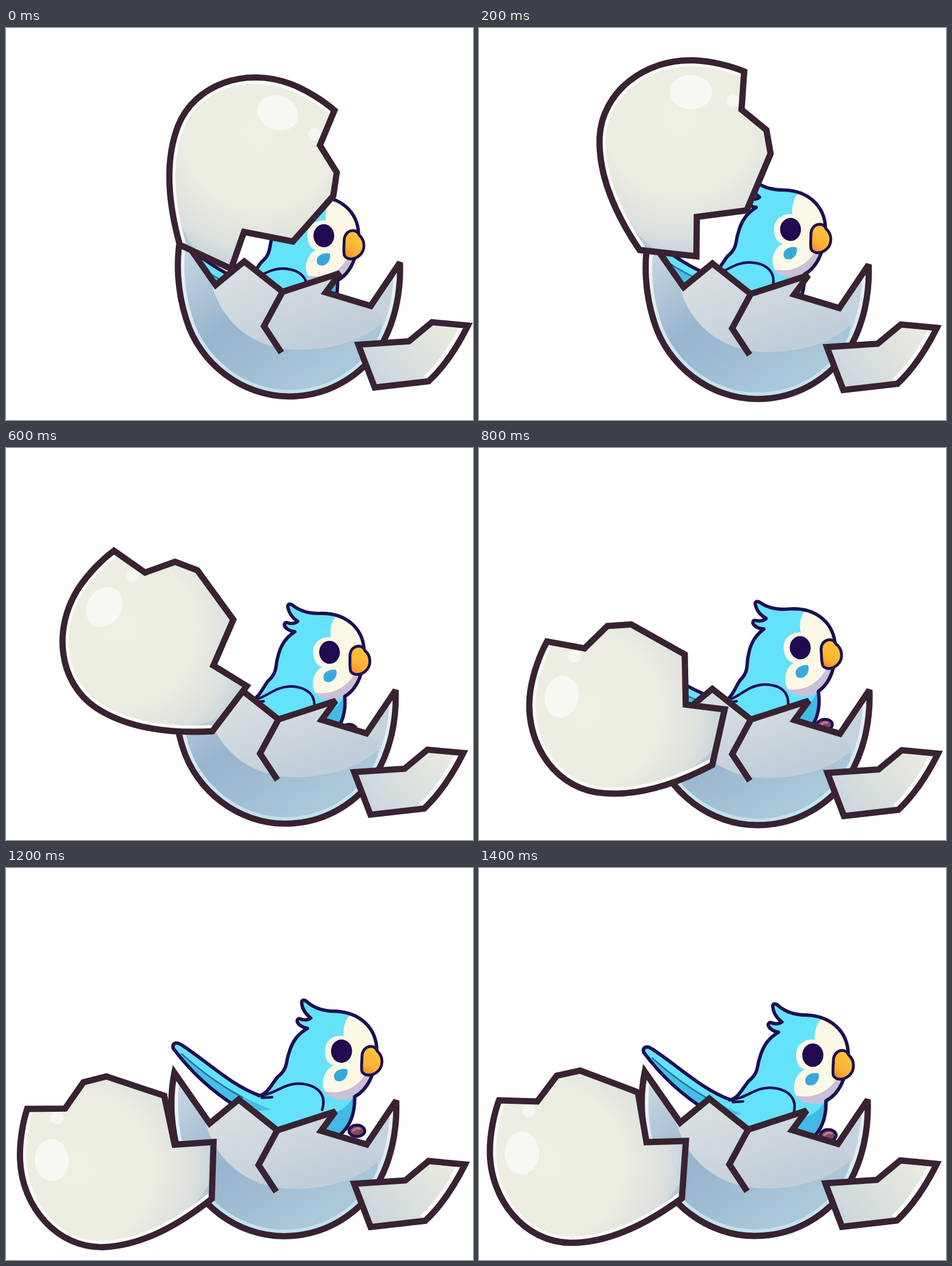
Write an HTML page that moves like this. It is 817 by 685 pixels and loops after 6.6 s.

```html
<!DOCTYPE html>
<html lang="en">
<head>
<meta charset="utf-8">
<title>Hatching bird</title>
<style>
html, body { margin: 0; width: 100%; height: 100%; overflow: hidden; background: #fff; }
svg { display: block; width: 817px; height: 685px; }
.line { fill: none; stroke: #392231; stroke-width: 11; stroke-miterlimit: 3; }
.ink { fill: none; stroke: #1d1050; stroke-width: 6; stroke-linejoin: round; stroke-linecap: round; }
</style>
</head>
<body>
<svg viewBox="0 0 817 685">
  <defs>
    <path id="bodyShape" d="M514 243C513 236 519 236 524 241C538 253 555 257 574 257C615 259 645 285 646 325C645 365 630 395 607 407C608 440 596 462 580 475L470 480L400 425C360 400 320 365 288 322C286 312 294 310 304 317C350 347 390 387 440 405C454 402 461 385 472 372C490 358 486 345 491 332C497 310 507 297 524 287C516 286 508 281 506 275C506 270 509 269 513 271C520 273 525 273 530 269C521 262 515 253 514 243Z"/>
    <path id="cupShape" d="M290 356C281 400 283 455 300 507C324 585 400 643 482 643C560 643 615 600 645 555C672 510 682 455 680 405L628 482L548 458L573 424L471 457L403 403L352 445Z"/>
    <path id="chipShape" d="M606 551L696 545L737 511L801 517C782 555 759 590 731 616L635 627Z"/>
    <path id="capShape" d="M35 406L102 408L136 363L177 354L278 392L293 479L362 477L355 577C290 625 225 655 160 655C80 654 19 580 19 495C19 465 26 430 35 406Z"/>
    <clipPath id="bodyClip"><use href="#bodyShape"/></clipPath>
    <clipPath id="cupClip"><use href="#cupShape"/></clipPath>
    <clipPath id="chipClip"><use href="#chipShape"/></clipPath>
    <clipPath id="capClip"><use href="#capShape"/></clipPath>
    <clipPath id="window"><rect id="windowRect" width="817" height="685"/></clipPath>
    <linearGradient id="cupDark" gradientUnits="userSpaceOnUse" x1="300" y1="370" x2="480" y2="645">
      <stop offset="0" stop-color="#cbd8e2"/><stop offset=".5" stop-color="#98b4ce"/><stop offset="1" stop-color="#abc7da"/>
    </linearGradient>
    <linearGradient id="cupLight" gradientUnits="userSpaceOnUse" x1="440" y1="420" x2="490" y2="560">
      <stop offset="0" stop-color="#d8dedf"/><stop offset="1" stop-color="#c1ced8"/>
    </linearGradient>
    <linearGradient id="rim" gradientUnits="userSpaceOnUse" x1="0" y1="400" x2="0" y2="640">
      <stop offset="0" stop-color="#f4f8fa"/><stop offset="1" stop-color="#c0e4f0"/>
    </linearGradient>
    <linearGradient id="chipFill" gradientUnits="userSpaceOnUse" x1="770" y1="520" x2="640" y2="625">
      <stop offset="0" stop-color="#e9eae0"/><stop offset="1" stop-color="#cbd6db"/>
    </linearGradient>
    <radialGradient id="capFill" gradientUnits="userSpaceOnUse" cx="120" cy="515" r="270">
      <stop offset="0" stop-color="#efefe2"/><stop offset=".5" stop-color="#ecece0"/><stop offset=".75" stop-color="#dce1de"/><stop offset="1" stop-color="#b8c9d6"/>
    </radialGradient>
    <linearGradient id="beakFill" x1=".7" y1=".2" x2=".2" y2="1">
      <stop offset="0" stop-color="#ffc23c"/><stop offset=".6" stop-color="#ffb134"/><stop offset="1" stop-color="#f5852d"/>
    </linearGradient>
  </defs>

  <g clip-path="url(#window)">
    <g id="bird">
      <ellipse cx="611" cy="467" rx="14" ry="10" fill="#7d4765" stroke="#1d1050" stroke-width="5"/>
      <path d="M603 468q7-8 15-4" fill="none" stroke="#b9788f" stroke-width="4"/>
      <use href="#bodyShape" fill="#64e2f9"/>
      <g clip-path="url(#bodyClip)">
        <path d="M286 318C330 362 390 400 460 430L400 435C350 410 310 365 286 318Z" fill="#45bfe6"/>
        <path d="M553 432C572 440 592 430 607 405L612 480H545Z" fill="#43b9e7"/>
        <path d="M600 263C590 270 586 290 588 300C566 298 553 312 555 330C556 345 563 350 570 352C552 360 546 385 556 400C568 414 595 412 607 406C635 390 646 360 646 325C645 292 625 268 600 263Z" fill="#fcf8e6"/>
        <path d="M553 397C582 404 607 394 625 370L650 372L607 408C588 416 564 413 553 397Z" fill="#cac0d8"/>
      </g>
      <path d="M303 332C340 365 372 388 410 408" class="ink" style="stroke:#246f9f;stroke-width:2.5"/>
      <use href="#bodyShape" class="ink"/>
      <path d="M438 406C470 402 480 384 510 384C543 386 558 404 550 430M444 409L462 408" class="ink" style="stroke-width:4.5"/>
      <ellipse cx="584" cy="327" rx="18.5" ry="20.5" fill="#220a50"/>
      <path d="M571 373C569 362 584 356 594 359C597 368 590 380 580 380C574 380 571 377 571 373Z" fill="#38a8dc"/>
      <path id="beak" d="M620 336C621 316 643 314 647 327C658 337 658 355 646 364C637 371 625 371 620 363C618 354 620 346 620 336Z" fill="url(#beakFill)"/>
      <path d="M620 340C621 316 643 314 647 329C636 329 628 333 620 340Z" fill="#4da2d9"/>
      <use href="#beak" class="ink" style="fill:none;stroke-width:5"/>
    </g>
  </g>

  <g id="base">
    <g clip-path="url(#cupClip)">
      <use href="#cupShape" fill="url(#cupDark)"/>
      <path d="M342 430C355 505 415 560 500 560C575 560 635 535 668 490L690 380L400 380Z" fill="url(#cupLight)"/>
      <path d="M629 482L680 400V470Q668 500 645 530Q655 500 629 482Z" fill="#c6d3dc"/>
      <path d="M290 356C281 400 283 455 300 507C324 585 400 643 482 643C560 643 615 600 645 555C672 510 682 455 680 405" fill="none" stroke="url(#rim)" stroke-width="23" opacity=".9"/>
    </g>
    <use href="#cupShape" class="line"/>
    <path d="M471 457L438 518L469 565" class="line"/>
    <g clip-path="url(#chipClip)">
      <use href="#chipShape" fill="url(#chipFill)"/>
      <path d="M801 517C782 555 759 590 731 616" fill="none" stroke="#fafbf8" stroke-width="25"/>
    </g>
    <use href="#chipShape" class="line"/>
  </g>

  <g id="cap">
    <g clip-path="url(#capClip)">
      <use href="#capShape" fill="url(#capFill)"/>
      <path d="M364 525C345 575 300 612 235 645L355 600Z" fill="#a9bfd2" opacity=".55"/>
      <path d="M355 577C290 625 225 655 160 655C80 654 19 580 19 495C19 465 26 430 35 406" fill="none" stroke="#fafaf6" stroke-width="22"/>
      <ellipse cx="75" cy="498" rx="30" ry="37" fill="#f8f8f3"/>
      <circle cx="87" cy="424" r="11.5" fill="#f6f6f0"/>
    </g>
    <use href="#capShape" class="line"/>
  </g>
</svg>
<script>
const LOOP = 6600, STEP = 200;
const CAP_A = [34, 406], CAP_B = [355, 577], TIP = [809, 515], EYE = [584, 327];

// base: tip x, y, scale; cap: its two rim ends; bird: eye x, y, tilt
const poses = [
  { base: [816, 518, .983], cap: [575, 143, 304, 379], bird: [556, 363, -1] },
  { base: [809, 522, .987], cap: [464, 75, 281, 388], bird: [545, 352, -1] },
  { base: [804, 525, .96], cap: [276, 88, 301, 439], bird: [570, 366, 0] },
  { base: [808, 531, .98], cap: [188, 179, 361, 495], bird: [566, 357, -3] },
  { base: [811, 532, .992], cap: [118, 338, 408, 554], bird: [562, 349, -6.5] },
  { base: [812, 527, .99], cap: [33, 435, 363, 577], bird: [590, 344, -1.5] },
  { base: [811, 516, .995], cap: [36, 421, 360, 578], bird: [587, 320, 0] },
  { base: [809, 515, 1], cap: [34, 406, 355, 577], bird: [584, 327, 0] }
];

const el = id => document.getElementById(id);
const bird = el('bird'), base = el('base'), cap = el('cap'), windowRect = el('windowRect');

function place(node, [px, py], x, y, scale, deg = 0) {
  node.setAttribute('transform',
    `translate(${x} ${y}) rotate(${deg}) scale(${scale}) translate(${-px} ${-py})`);
}

const span = (x0, y0, x1, y1) => ({
  length: Math.hypot(x1 - x0, y1 - y0),
  angle: Math.atan2(y1 - y0, x1 - x0) * 180 / Math.PI
});
const rest = span(...CAP_A, ...CAP_B);

let shown = -1;
function draw(now) {
  const step = Math.min(poses.length - 1, Math.floor(now % LOOP / STEP));
  if (step !== shown) {
    shown = step;
    const p = poses[step], rim = span(...p.cap);
    place(base, TIP, ...p.base);
    place(cap, CAP_A, p.cap[0], p.cap[1], rim.length / rest.length, rim.angle - rest.angle);
    place(bird, EYE, p.bird[0], p.bird[1], p.base[2], p.bird[2]);
    // The tail stays inside the egg until it opens
    windowRect.setAttribute('x', step < 2 ? 318 : 0);
  }
  requestAnimationFrame(draw);
}
draw(performance.now());
</script>
</body>
</html>
```
